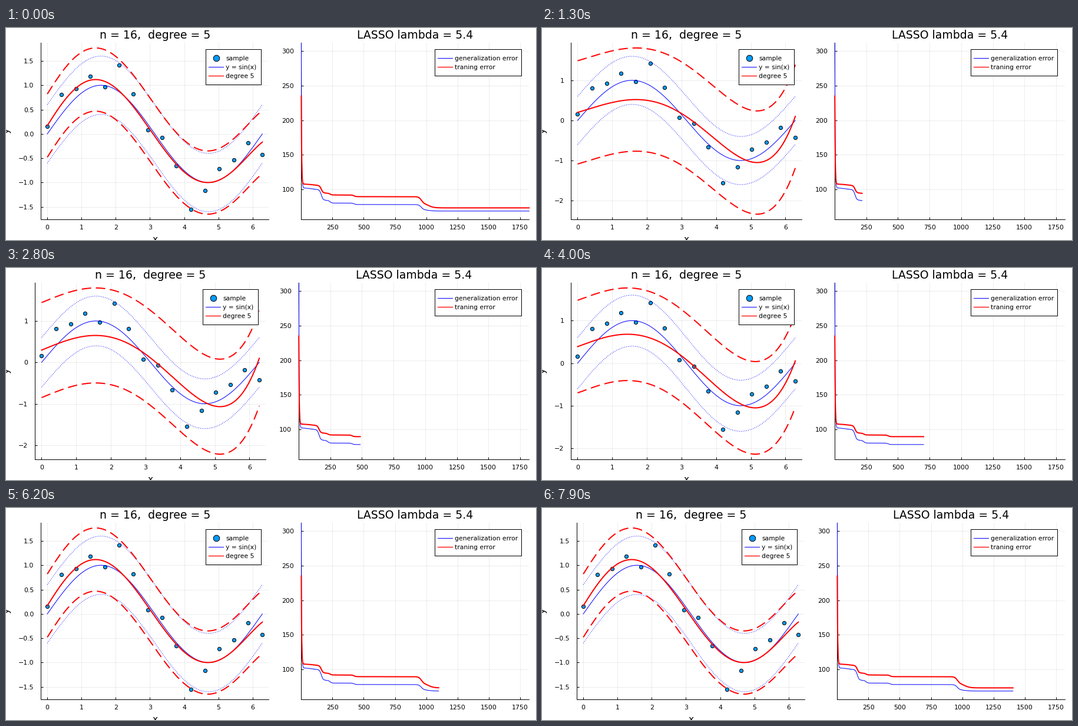
These frames come from a looping animation (900 px wide and 360 px high, 8000 ms). A matplotlib script:

```python
import numpy as np
import matplotlib.pyplot as plt
from matplotlib.animation import FuncAnimation

W, H = 900, 360
TOP, BOTTOM, RIGHT = 25.4, 324.6, 888.4
FRAMES, INTERVAL = 80, 100
N_MAX, N_STEP = 1822, 18
PT = 0.72  # points per pixel at 100 dpi
DASH, DOT = (0, (8, 4)), (0, (1, 2))

xs = np.linspace(0, 2 * np.pi, 300)
sx = np.linspace(0, 2 * np.pi, 16)
sy = [.16, .81, .93, 1.18, .97, 1.42, .82, .08,
      -.07, -.66, -1.55, -1.16, -.72, -.54, -.18, -.42]

# Key poses of the fit: y(0), peak x, peak y, trough x, trough y, y(2 pi), sigma
KEYS = [1, 13, 22, 40, 54, 60]
POSES = np.array([
    (.10, 1.80, .44, 5.22, -1.00, .09, 1.65),
    (.20, 1.68, .52, 5.18, -1.05, .10, 1.287),
    (.25, 1.61, .635, 5.16, -1.08, .12, 1.177),
    (.39, 1.44, .68, 5.13, -1.05, .055, 1.088),
    (.39, 1.41, .775, 5.04, -1.05, .07, .994),
    (.17, 1.41, 1.117, 4.69, -1.00, -.168, .65),
])

# Centre and width of each drop in the error curves
DROPS = [(95, 30), (161, 7), (230, 7), (422, 7), (960, 10), (1015, 22)]


def error_curve(n, start, final, sizes):
    """Fast initial decay followed by a staircase of soft drops."""
    plateau = final + sum(size / (1 + np.exp((n - c) / w))
                          for size, (c, w) in zip(sizes, DROPS))
    return plateau + (start - plateau[0]) * np.exp(-(n - 1) / 3)


iters = np.arange(1.0, N_MAX + 1)
train = error_curve(iters, 235, 73.4, (2.4, 10.8, 2.7, 2.4, 9, 7.2))
general = error_curve(iters, 311, 68.8, (3, 15, 4, 2.1, 7.4, 2))


def quintic(x, y0, xp, yp, xm, ym, ye):
    """Quintic with given end values and two given extrema."""
    def base(t):
        return yp + (ym - yp) * t * t * (3 - 2 * t)

    def bump(t):
        return (t * (1 - t)) ** 2

    t = (x - xp) / (xm - xp)
    a, b = t[0], t[-1]
    ra = (y0 - base(a)) / bump(a)
    rb = (ye - base(b)) / bump(b)
    return base(t) + bump(t) * (ra + (rb - ra) * (t - a) / (b - a))


def state(frame):
    """Number of iterations shown, fitted curve and sigma."""
    # the loop opens on the finished fit
    key = frame or FRAMES
    n = 1 + N_STEP * (frame - 1) if frame else N_MAX
    *shape, sigma = [np.interp(key, KEYS, col) for col in POSES.T]
    return n, quintic(xs, *shape), sigma


fig = plt.figure(figsize=(W / 100, H / 100), dpi=100, facecolor="white")


def place(ax, left, top, right, bottom):
    ax.set_position([left / W, 1 - bottom / H, (right - left) / W, (bottom - top) / H])


def make_axes():
    ax = fig.add_axes([0, 0, 1, 1])
    ax.set_axisbelow(True)
    ax.grid(True, color="black", alpha=0.07, lw=PT)
    ax.spines[["top", "right"]].set_visible(False)
    ax.spines[["left", "bottom"]].set_linewidth(PT)
    ax.tick_params(direction="in", length=4 * PT, width=PT, labelsize=11 * PT)
    ax.tick_params(axis="x", pad=9 * PT)
    ax.tick_params(axis="y", pad=12 * PT)
    return ax


def make_legend(width, height, entries):
    ax = fig.add_axes([0, 0, 0.1, 0.1], zorder=5, facecolor="white")
    ax.set(xlim=(0, width), ylim=(height, 0), xticks=[], yticks=[])
    for spine in ax.spines.values():
        spine.set_linewidth(PT)
    for i, (label, color, lw) in enumerate(entries):
        y = 15 + 15.2 * i
        if lw:
            ax.plot([4.5, 30], [y, y], color=color, lw=lw * PT)
        else:
            ax.plot(17.3, y, "o", ms=10.5 * PT, mfc=color, mec="black", mew=PT)
        ax.text(34, y + 4, label, size=10.8 * PT)
    return ax


def text(label, y, size):
    return fig.text(0, 1 - y / H, label, size=size * PT, ha="center", va="baseline")


def line(ax, color, lw, style="-"):
    return ax.plot([], [], color=color, lw=lw * PT, ls=style, zorder=3,
                   clip_on=False, dash_capstyle="butt")[0]


left = make_axes()
pad = 0.03 * 2 * np.pi
left.set_xlim(-pad, 2 * np.pi + pad)
left.set_xticks(range(7))
left.plot(sx, sy, "o", ms=6.2 * PT, mfc="#009afa", mec="black", mew=PT, zorder=3)
line(left, "blue", 1).set_data(xs, np.sin(xs))
mean_line = line(left, "red", 2)
for d in (-0.6, 0.6):
    line(left, "blue", 1, DOT).set_data(xs, np.sin(xs) + d)
low_line = line(left, "red", 2, DASH)
high_line = line(left, "red", 2, DASH)

right = make_axes()
right.set(xlim=(1, N_MAX), ylim=(57.1, 311.5))
right.set_xticks(range(250, 1751, 250))
right.set_yticks(range(100, 301, 50))
general_line = line(right, "blue", 1)
train_line = line(right, "red", 2)

left_key = make_legend(94, 60, [("sample", "#009afa", 0),
                                ("y = sin(x)", "blue", 1),
                                ("degree 5", "red", 1.3)])
right_key = make_legend(147, 45, [("generalization error", "blue", 1),
                                  ("traning error", "red", 1.3)])
place(right_key, RIGHT - 160, 35.6, RIGHT - 13, 80.6)

left_title = text("n = 16,  degree = 5", 17.5, 18.9)
right_title = text("LASSO lambda = 5.4", 17.5, 18.9)
x_label = text("x", 364.5, 15.3)
fig.text(8.5 / W, 1 - 174.5 / H, "y", size=15.3 * PT, rotation=90,
         ha="right", va="center")


def layout(wide):
    """Wider tick labels push the axes to the right."""
    l0, l1, r0 = (59.2, 446.2, 501.4) if wide else (49.4, 441.2, 497.2)
    place(left, l0, TOP, l1, BOTTOM)
    place(right, r0, TOP, RIGHT, BOTTOM)
    place(left_key, l1 - 106.8, 35.6, l1 - 12.8, 95.6)
    left_title.set_x((l0 + l1) / 2 / W)
    x_label.set_x((l0 + l1) / 2 / W)
    right_title.set_x((r0 + RIGHT) / 2 / W)


def draw(frame):
    n, mean, sigma = state(frame)
    mean_line.set_data(xs, mean)
    low_line.set_data(xs, mean - sigma)
    high_line.set_data(xs, mean + sigma)

    lo = min((mean - sigma).min(), -1.6)
    hi = max((mean + sigma).max(), 1.6)
    margin = 0.03 * (hi - lo)
    lo, hi = lo - margin, hi + margin
    left.set_ylim(lo, hi)

    wide = lo > -2
    step = 0.5 if wide else 1
    ticks = np.arange(np.ceil(lo / step), np.floor(hi / step) + 1) * step
    fmt = "{:.1f}" if wide else "{:.0f}"
    left.set_yticks(ticks, [fmt.format(v + 0.0).replace("-", "\u2212") for v in ticks])
    layout(wide)

    general_line.set_data(iters[:n], general[:n])
    train_line.set_data(iters[:n], train[:n])
    return []


anim = FuncAnimation(fig, draw, frames=FRAMES, interval=INTERVAL,
                     init_func=lambda: draw(0), repeat=True, repeat_delay=0, blit=False)
plt.show()
```
